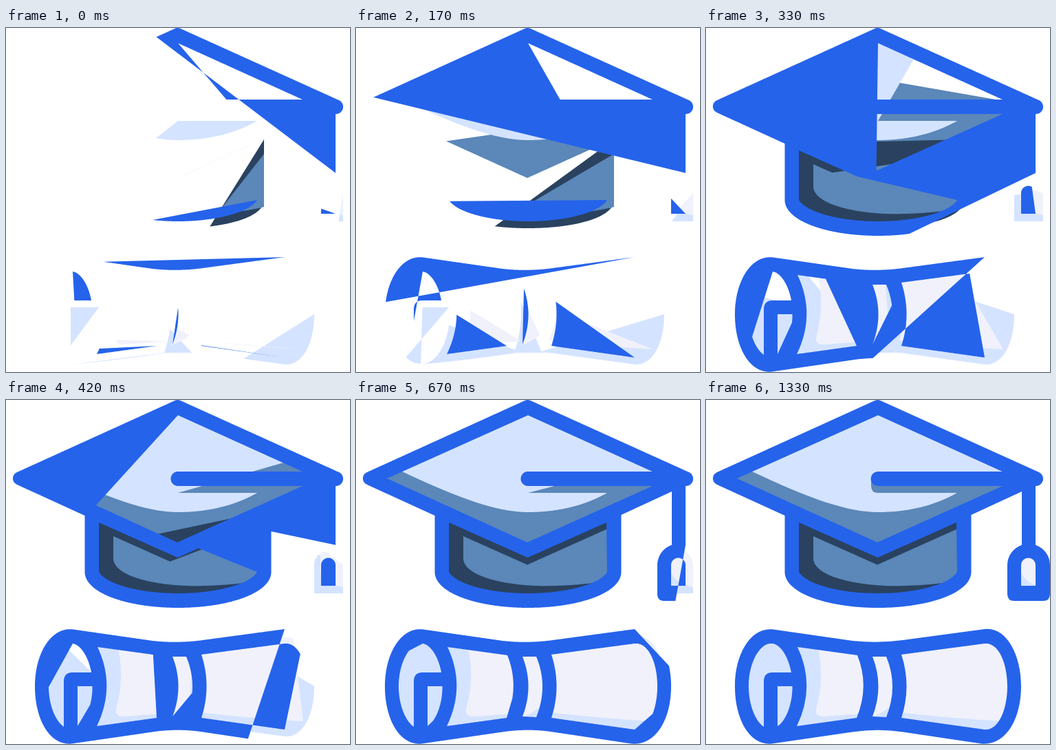
These frames come from a looping animation (500 px wide and 500 px high, 1.41 s). An HTML page:

```html
<!DOCTYPE html>
<html lang="en">
<head>
<meta charset="utf-8">
<title>Graduation cap and diploma</title>
<style>
  html, body { margin: 0; width: 100%; height: 100%; overflow: hidden; background: #fff; }
  svg { display: block; width: 100vw; height: 100vh; }
</style>
</head>
<body>
<svg id="stage" viewBox="0 0 500 500"></svg>
<script>
const BLUE = '#2563eb', LIGHT = '#d4e3ff', STEEL = '#5b87b9', DARK = '#2a425f', PALE = '#f0f1fa';

// Back to front; each contour is traced from its first point.
const layers = [
  // board
  [STEEL, ['M479 114L249 218L20 114L249 11Z']],
  [LIGHT, ['M250 135H365C330 155 290 163 250 163C205 163 150 143 67 104L250 22L431 104V125H250L240 114V125Q240 135 250 135Z']],
  // skull band
  [DARK, ['M375 162V250C375 275 320 291 250 291S125 275 125 250V163L249 218Z']],
  [STEEL, ['M375 183V260C345 268 300 271 260 270C200 267 156 252 156 230V198L249 239.5Z']],
  // diploma: rolled end, left sheet, right sheet, ribbon
  [LIGHT, [
    'M135 406H94V488C70 488 52 456 52 416S70 343 94 343C114 343 130 370 135 406Z',
    'M94 488V406H135C139 445 120 486 94 488Z',
    'M240 471Q170 482 94 489C118 488 136 456 136 416S118 343 94 343L240 362Q252 416 240 471Z',
    'M448 416C448 460 430 491 405 489L282 472L245 471Q256 416 245 362L282 360L405 343C430 341 448 372 448 416Z',
    'M270 472H230Q249 416 232 362H272Q291 416 270 472Z'
  ]],
  [PALE, [
    'M240 455L172 460Q156 461 161 445Q172 405 163 361L236 371Q247 416 240 455Z',
    'M432 467Q360 463 280 454Q301 412 280 363L405 345C430 343 447 372 447 416Q446 448 432 467Z',
    'M267 446Q258 455 240 461Q259 416 240 370H264Q281 416 267 446Z'
  ]],
  // tassel
  [LIGHT, ['M490 240V281H448V240A21 21 0 0 1 490 240Z']],
  [PALE, ['M490 240V272Q466 268 457 250V223A21 21 0 0 1 490 240Z']],
  // outlines, with openings wound the other way
  [BLUE, [
    'M479 210.7V125A10.5 10.5 0 0 0 484 105L254 1Q249.5 -1 245 1L16 105Q10 108 10 114Q10 120 16 123L114.5 168V250C114.5 280 175 302 250 302S385.5 280 385.5 250V167L459 133V210.7A31 31 0 0 0 438 240V282Q438 292 448 292H490Q500 292 500 282V240A31 31 0 0 0 479 210.7Z',
    'M250 22L431 104H250A10.5 10.5 0 0 0 250 125H431L249 207L45 114Z',
    'M365 250C354 268 305 281 250 281S146 268 135 250V178L249.5 229L364 178Z',
    'M479 270H458V240A10.5 10.5 0 0 1 479 240Z',
    'M405 333L286 349Q250 354 213 350L98 333.5C66 329 42 368 42 416C42 465 64 503 96 499.5L213 482.5Q250 477 286 482.5L400 499.5C435 503 458 465 458 416C458 368 435 329 405 333Z',
    'M97 354C109 356 120 374 124 396H97Q84 396 84 409V475C70 465 62 440 62 416C62 382 78 354 94 354Z',
    'M104 474V416H125.5C126 440 117 466 104 474Z',
    'M219 462L132 474Q160 416 133 359L220 371Q238 416 219 462Z',
    'M242 460Q259 416 242 373H262Q280 416 262 461Z',
    'M405 479L284 462Q299 416 284 370L405 354C425 352 438 382 438 416S425 481 405 479Z'
  ]]
];

const NS = 'http://www.w3.org/2000/svg';
const stage = document.getElementById('stage');

function makePath(d, fill) {
  const el = document.createElementNS(NS, 'path');
  el.setAttribute('d', d);
  if (fill) el.setAttribute('fill', fill);
  return el;
}

// Samples a contour about once per pixel.
function contour(d) {
  const el = makePath(d), total = el.getTotalLength(), pts = [];
  const at = s => {
    const q = el.getPointAtLength(s);
    return q.x.toFixed(2) + ' ' + q.y.toFixed(2);
  };
  for (let s = 0; s < total; s++) pts.push(at(s));
  return p => p > 0.9995 ? d
    : 'M' + pts.slice(0, Math.ceil(p * total)).join('L') + 'L' + at(p * total) + 'Z';
}

const shapes = layers.map(([fill, list]) => ({
  el: stage.appendChild(makePath('', fill)),
  parts: list.map(contour)
}));

// cubic-bezier(.25, .1, .25, 1)
function ease(x) {
  if (x <= 0) return 0;
  if (x >= 1) return 1;
  let lo = 0, hi = 1, s;
  for (let i = 0; i < 24; i++) {
    s = (lo + hi) / 2;
    if (0.75 * s * (1 - s) + s ** 3 < x) lo = s; else hi = s;
  }
  return 0.3 * (1 - s) ** 2 * s + 3 * (1 - s) * s * s + s ** 3;
}

const LOOP = 1410, STEP = 1000 / 12, DELAY = 16, SPAN = 1045, FROM = 0.249;
let shown = -1;

function draw(t) {
  const step = Math.floor((t % LOOP + 4) / STEP);
  if (step === shown) return;
  shown = step;
  const p = FROM + (1 - FROM) * ease((step * STEP - DELAY) / SPAN);
  for (const { el, parts } of shapes) {
    el.setAttribute('d', parts.map(part => part(p)).join(''));
  }
}

const start = performance.now();
function tick() {
  draw(performance.now() - start);
  requestAnimationFrame(tick);
}
tick();
</script>
</body>
</html>
```
